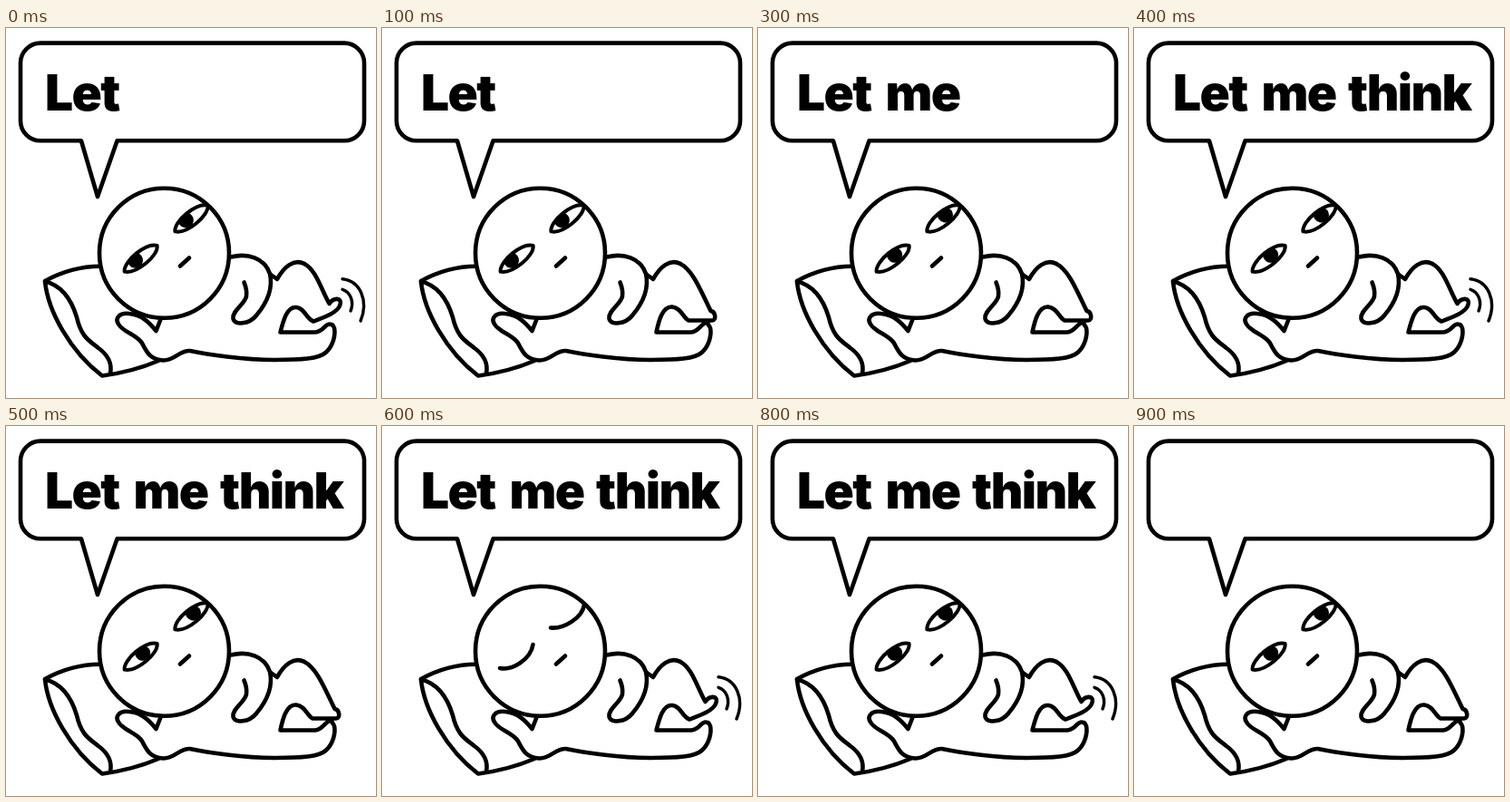
Recreate the animation shown at these times as an HTML page. Size 408 by 408 pixels, loop 1000 ms.

```html
<!DOCTYPE html>
<html lang="en">
<head>
<meta charset="utf-8">
<title>Let me think</title>
<style>
html, body { margin: 0; width: 100%; height: 100%; overflow: hidden; background: #fff; }
svg { display: block; width: 100vw; height: 100vh; }
.line { fill: none; stroke: #000; stroke-width: 4.6; stroke-linecap: round; stroke-linejoin: round; }
.white { fill: #fff; }
.thin { stroke-width: 3.4; }
text { font: 900 55px Inter, Roboto, sans-serif; letter-spacing: -1.6px; }
</style>
</head>
<body>
<svg viewBox="0 0 408 408">
  <defs>
    <path id="almond" d="M-23 1C-17 -9 15 -11 23 -1C18 9 -14 11 -23 1Z"/>
    <clipPath id="lens"><use href="#almond"/></clipPath>
  </defs>

  <g class="line">
    <rect x="16" y="16.600" width="379" height="107.700" rx="22"/>
    <path class="white" stroke="none" d="M84 120H121V128H84Z"/>
    <path d="M83 124.500L101 186L122.500 124.500"/>
  </g>
  <g id="words">
    <text x="43" y="90.500">Let</text>
    <text x="140.500" y="90.500">me</text>
    <text x="236" y="90.500">think</text>
  </g>

  <g class="line">
    <!-- pillow -->
    <path d="M104 262.800Q72 263 43 279C46 312 71 357 106 383.500Q140 379 168 367"/>
    <path d="M43 279.500C62 284 72 299 78 319C83 341 92 345 102 353C113 361 117 371 115 381"/>
    <!-- hand, back and lower foot -->
    <path class="white" stroke="none" d="M135 315L172 318L200 340L173 367C158 366 154 357 149 348C143 339 128 336 123 327C119 321 124 314 135 315Z"/>
    <path d="M171 320L165.500 334C159 326 150 316 136 315C125 313.500 120 320 124 326.500C129 335.500 144 338 150 347.500C155 357 159 366 173.500 366.500C187 366.500 191 355 203 356C222 360 262 366 296 366C325 366 345 365 353 357.500C361 350 363.500 338 362 331Q361 328 360 327.500"/>
    <!-- arm -->
    <path d="M248 252.500C266 248 285 253 291 271C295 289 287 304 276 317C268 327 252 328 250.500 320.500C249 312 263 305 265 296C266 289 264 284 262.500 280.500"/>
    <path d="M292 272L299 277C306 264 317 254 329 260"/>
    <g id="up">
      <path d="M329 260C342 267 347 287 356.500 304C361 297 371 297 368.500 305C366 314 350 319.500 339 323.500C330 320 330 309 320 308C310 307 306 322 302.500 335.500H341C350 335 351 327 356.500 326.500Q359 326.500 360 327.500"/>
      <path class="thin" d="M371 276.800C391 279 400 301 391 323"/>
      <path class="thin" d="M371 288.300C380 291 384 302 380 312"/>
    </g>
    <g id="down">
      <path d="M329 260C343 267 352 291 362.500 312C368 313 369 322 364 322.500H338C332 319.500 330 308.500 320 307.500C309 306.500 305 324 302.500 335.500H341C349 335 352 326 358 324.500Q360 326 360 327.500"/>
    </g>
    <circle class="white" cx="174.500" cy="248.300" r="71.500"/>
    <path d="M192 262.500L202 253.500"/>
    <g id="shut">
      <path d="M130 267C144 270 164 257 166.500 241"/>
      <path d="M186 222.500C200 224 221 212 223 197"/>
    </g>
  </g>
  <g id="open"></g>
</svg>
<script>
const STEP = 100, LOOP = 1000;
const el = id => document.getElementById(id);
const show = (node, on) => node.setAttribute('visibility', on ? 'visible' : 'hidden');

const eye = (x, y) => `<g transform="translate(${x} ${y}) rotate(-36)">
  <g clip-path="url(#lens)"><circle class="pupil" cy="-2" r="8.5"/></g>
  <use class="line" style="stroke-width:4" href="#almond"/></g>`;
el('open').innerHTML = eye(148.6, 254.3) + eye(204.4, 210);

const words = [...el('words').children];
const pupils = document.querySelectorAll('.pupil');

function draw(time) {
  const step = Math.floor((time % LOOP) / STEP);
  const count = step === 9 ? 0 : Math.min(3, 1 + (step >> 1));
  words.forEach((word, i) => show(word, i < count));

  const raised = step % 2 === 0;
  show(el('up'), raised);
  show(el('down'), !raised);

  const closed = step === 6 || step === 7;
  show(el('shut'), closed);
  show(el('open'), !closed);
  pupils.forEach(p => p.setAttribute('cx', step < 2 ? -6 : 4));
}

const start = performance.now();
function tick() {
  draw(performance.now() - start);
  requestAnimationFrame(tick);
}
tick();
</script>
</body>
</html>
```
